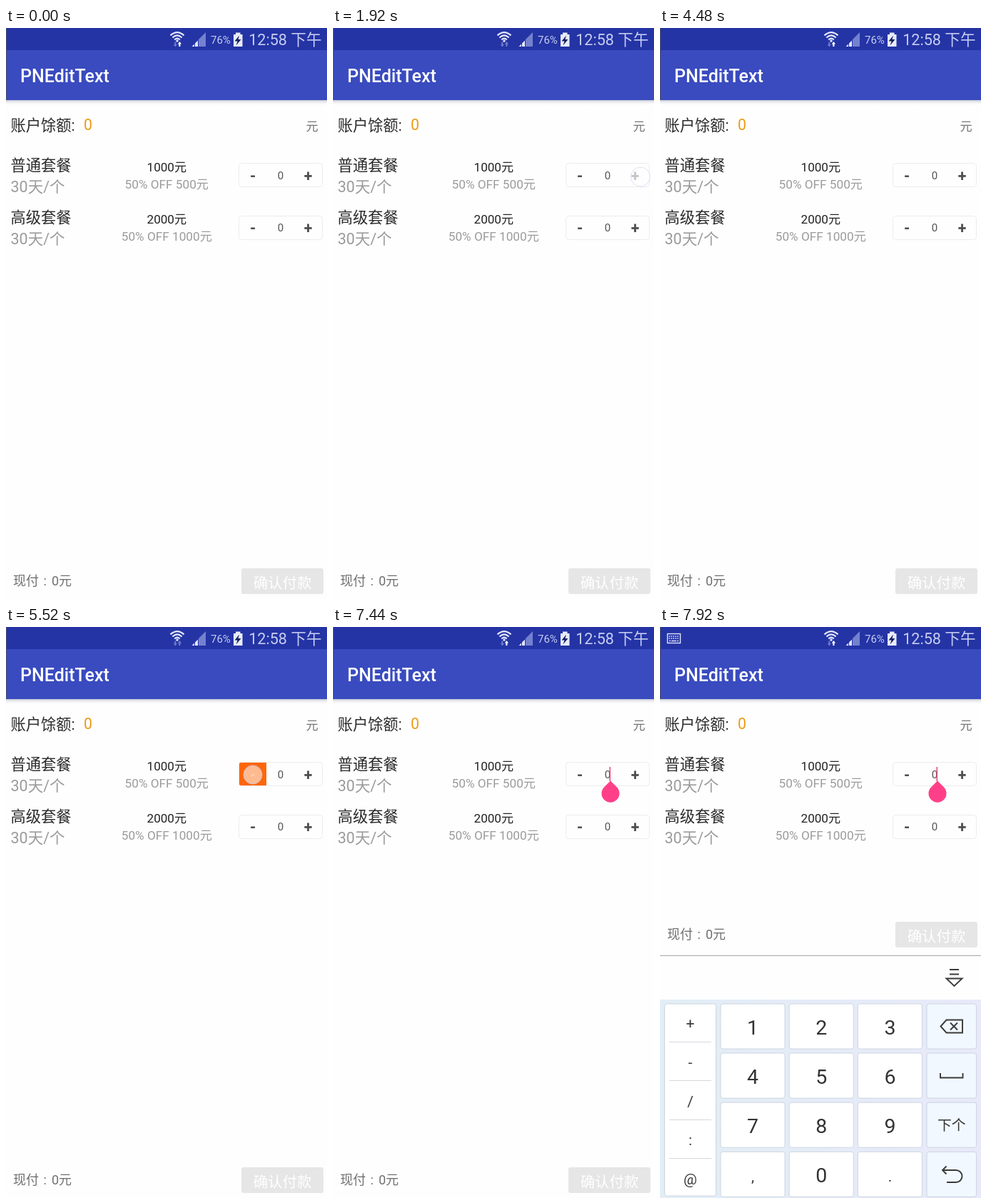
These frames come from a looping animation (450 px wide and 800 px high, 8 s). An HTML page:

```html
<!DOCTYPE html>
<html lang="zh-CN">
<head>
<meta charset="utf-8">
<title>PNEditText</title>
<style>
html, body { margin: 0; width: 100%; height: 100%; overflow: hidden; background: #fefefe; }
svg { display: block; width: 100vw; height: 100vh; }
text { font-family: Roboto, "Noto Sans CJK SC", "Noto Sans CJK", sans-serif; white-space: pre; }
.mid { text-anchor: middle; }
.name { font-size: 21.25px; fill: #2b2b2b; }
.days { font-size: 21.5px; fill: #9b9b9b; }
.price { font-size: 17.1px; fill: #222; text-anchor: middle; }
.off { font-size: 17.2px; fill: #9b9b9b; text-anchor: middle; }
.op { font-size: 21.25px; font-weight: 700; fill: #505050; text-anchor: middle; }
.num { font-size: 15px; fill: #555; text-anchor: middle; }
.box { fill: #fefefe; stroke: #ececec; }
.touch { fill: #fff; fill-opacity: .55; stroke: #c3c8f2; stroke-opacity: .8; }
.key { fill: #fff; stroke: #c6ced9; stroke-width: .8; }
.side { fill: #f1f8ff; }
.digit { font-size: 28.5px; fill: #333; text-anchor: middle; }
.sym { font-size: 21px; fill: #3a3a3a; text-anchor: middle; }
.line { fill: none; stroke: #3a3a3a; stroke-width: 1.9; }

/* 8 s loop: one percent is one 80 ms step */
.anim { animation: 8s step-end infinite; }
.up { animation-name: up; }
.plus-bg { animation-name: plus-bg; }
.plus { animation-name: plus; }
.plus-touch { animation-name: plus-touch; }
.minus-bg { animation-name: minus-bg; }
.minus { animation-name: minus; }
.minus-touch { animation-name: minus-touch; }
.edit-touch { animation-name: edit-touch; }
.caret { animation-name: caret; }
.handle { animation-name: handle; }
.pay { animation-name: pay; }
.badge { animation-name: badge; }
.board { animation-name: board; }
.bar-line { animation-name: bar-line; }
.key-line { animation-name: key-line; }

@keyframes up {
  0%, 14%, 34%, 56%, 84%, 100% { fill: #fff; }
  4%, 22%, 42%, 64% { fill: #6f7cc9; }
}
@keyframes plus-bg {
  0%, 8%, 16%, 24%, 33%, 43%, 100% { opacity: 0; }
  5%, 13%, 21%, 30%, 40% { opacity: 1; }
  7%, 15%, 23%, 32%, 42% { opacity: .4; }
}
@keyframes plus {
  0%, 10%, 18%, 26%, 35%, 45%, 100% { fill: #505050; }
  5%, 13%, 21%, 30%, 40% { fill: #fff; }
  7%, 15%, 23%, 32%, 42% { fill: #ddd; }
  8%, 16%, 24%, 33%, 43% { fill: #a0a0a0; }
  9%, 17%, 25%, 34%, 44% { fill: #6c6c6c; }
}
@keyframes plus-touch {
  0%, 9%, 17%, 25%, 34%, 44%, 100% { opacity: 0; }
  5%, 13%, 21%, 30%, 40% { opacity: 1; }
  8%, 16%, 24%, 33%, 43% { opacity: .7; }
}
@keyframes minus-bg {
  0%, 53%, 62%, 71%, 80%, 100% { opacity: 0; }
  50%, 59%, 68%, 77% { opacity: 1; }
  52%, 61%, 70%, 79% { opacity: .4; }
}
@keyframes minus {
  0%, 55%, 64%, 73%, 82%, 100% { fill: #505050; }
  50%, 59%, 68%, 77% { fill: #fb8a40; }
  52%, 61%, 70%, 79% { fill: #ddd; }
  53%, 62%, 71%, 80% { fill: #a0a0a0; }
  54%, 63%, 72%, 81% { fill: #6c6c6c; }
}
@keyframes minus-touch {
  0%, 54%, 63%, 72%, 81%, 100% { opacity: 0; }
  50%, 59%, 68%, 77% { opacity: 1; }
  53%, 62%, 71%, 80% { opacity: .7; }
}
@keyframes edit-touch {
  0%, 90%, 100% { opacity: 0; }
  87% { opacity: 1; }
  89% { opacity: .5; }
}
@keyframes caret {
  0%, 100% { opacity: 0; }
  88% { opacity: .4; }
  89% { opacity: 1; }
}
@keyframes handle {
  0%, 100% { opacity: 0; }
  90% { opacity: 1; }
}
@keyframes pay {
  0%, 100% { transform: translateY(0); }
  96% { transform: translateY(-344px); }
}
@keyframes badge {
  0%, 100% { opacity: 0; }
  95% { opacity: 1; }
}
@keyframes board {
  0%, 100% { opacity: 0; transform: translateY(80px); }
  95% { opacity: .3; transform: translateY(45px); }
  96% { opacity: .65; transform: translateY(24px); }
  97% { opacity: .88; transform: translateY(8.5px); }
  98% { opacity: .98; transform: translateY(1px); }
  99% { opacity: 1; transform: translateY(0); }
}
@keyframes bar-line {
  0%, 100% { opacity: 0; }
  98% { opacity: 1; }
}
@keyframes key-line {
  0%, 100% { opacity: 1; }
  98% { opacity: 0; }
}
</style>
</head>
<body>
<svg viewBox="0 0 450 800">
  <defs>
    <linearGradient id="shade" x2="0" y2="1">
      <stop stop-color="#8f93a8" stop-opacity=".5"/>
      <stop offset=".4" stop-color="#c9cbd6" stop-opacity=".3"/>
      <stop offset="1" stop-color="#fff" stop-opacity="0"/>
    </linearGradient>
    <linearGradient id="tint">
      <stop stop-color="#e2eef6"/>
      <stop offset="1" stop-color="#e8e9f9"/>
    </linearGradient>
  </defs>

  <rect width="450" height="800" fill="#fefefe"/>
  <rect y="101" width="450" height="8" fill="url(#shade)"/>
  <rect width="450" height="101" fill="#394bbf"/>
  <rect width="450" height="31" fill="#2434a5"/>
  <rect width="1" height="101" fill="#444a6b"/>

  <!-- status bar -->
  <g class="anim badge" opacity="0" stroke="#dfe3f8" fill="none">
    <rect x="10.5" y="9.5" width="18" height="13" stroke-width="1.4"/>
    <path d="M12.5 13H27M12.5 16H27" stroke-width="1.7" stroke-dasharray="1.7 1.2"/>
    <path d="M13 19.5H15M16 19.5H23M24 19.5H26" stroke-width="1.7"/>
  </g>
  <g fill="none" stroke="#e4e7fa" stroke-width="2.1">
    <path d="M230.5 10.4Q240 1.8 249.5 10.4"/>
    <path d="M233.4 13.5Q240 7.3 246.6 13.5"/>
    <path d="M236.3 16.4Q240 13 243.7 16.4"/>
  </g>
  <circle cx="240" cy="18" r="1.7" fill="#e4e7fa"/>
  <path d="M236.3 19.5h2v3.5h1.6l-2.6 3.5l-2.6-3.5h1.6z" fill="#6f7cc9"/>
  <path class="anim up" d="M242.3 26v-3.5h-1.6l2.7-3.5l2.7 3.5h-1.7v3.5z" fill="#fff"/>
  <path d="M270 26V16L280 6V26z" fill="#7481cf"/>
  <path d="M260.5 26L264 22.5V26zM265 26V21.5L269 17.5V26z" fill="#e4e7fa"/>
  <text x="287" y="21.5" font-size="15" fill="#c6ccf0">76%</text>
  <path d="M322 6.500h6.500v2.500h3v17h-12.500v-17h3z" fill="#e8ebfb"/>
  <path d="M327 10.500l-6.500 8h4l-2 6l7-8.500h-4z" fill="#14205f"/>
  <text x="340.2" y="24" font-size="21.6" fill="#c6ccf0">12:58 下午</text>

  <text x="20" y="76" font-size="25" font-weight="500" fill="#fff">PNEditText</text>

  <!-- balance -->
  <text class="name" x="6.5" y="144">账户馀额:</text>
  <text x="109" y="143" font-size="21.25" fill="#ec9a12">0</text>
  <text x="420.5" y="144" font-size="17.2" fill="#757575">元</text>

  <!-- first plan -->
  <text class="name" x="6.5" y="200">普通套餐</text>
  <text class="days" x="6.5" y="230">30天/个</text>
  <text class="price" x="225.3" y="201">1000元</text>
  <text class="off" x="225.3" y="225">50% OFF 500元</text>
  <rect class="box" x="326.5" y="189.5" width="117" height="33" rx="4"/>
  <path class="anim minus-bg" opacity="0" d="M365 190V222H329Q327 222 327 220V192Q327 190 329 190z" fill="#ff660a"/>
  <path class="anim plus-bg" opacity="0" d="M405 190V222H441Q443 222 443 220V192Q443 190 441 190z" fill="#ff660a"/>
  <text class="op anim minus" x="346" y="215">-</text>
  <text class="op anim plus" x="423.5" y="215">+</text>
  <text class="num" x="385" y="212">0</text>
  <path class="anim caret" opacity="0" d="M388.3 196V216" stroke="#e8467c" stroke-width="1.5"/>

  <!-- second plan -->
  <text class="name" x="6.5" y="273">高级套餐</text>
  <text class="days" x="6.5" y="303">30天/个</text>
  <text class="price" x="225.3" y="274">2000元</text>
  <text class="off" x="225.3" y="298">50% OFF 1000元</text>
  <rect class="box" x="326.5" y="263.5" width="117" height="33" rx="4"/>
  <text class="op" x="346" y="288">-</text>
  <text class="op" x="423.5" y="288">+</text>
  <text class="num" x="385" y="285">0</text>

  <!-- touches and caret handle -->
  <circle class="touch anim plus-touch" opacity="0" cx="431" cy="208.5" r="13.5"/>
  <circle class="touch anim minus-touch" opacity="0" cx="346" cy="207" r="13"/>
  <circle class="touch anim edit-touch" opacity="0" cx="397" cy="203.5" r="13.5"/>
  <path class="anim handle" opacity="0" d="M389 215.5l8.8 8.8a12.5 12.5 0 1 1 -17.6 0z" fill="#ff4088"/>

  <!-- payment bar -->
  <g class="anim pay">
    <text y="781" font-size="18" fill="#707070"><tspan x="10">现付</tspan><tspan x="52.5">:</tspan><tspan x="64">0元</tspan></text>
    <rect x="330" y="757" width="115" height="36" rx="3" fill="#e6e6e6"/>
    <text class="mid" x="387.5" y="784.5" font-size="20.4" fill="#fff">确认付款</text>
  </g>

  <!-- keyboard -->
  <g class="anim board" opacity="0">
    <rect y="460" width="450" height="62" fill="#fefefe"/>
    <path class="anim bar-line" d="M0 460.5H450" stroke="#a6a6ac"/>
    <path class="line" d="M406 480H419M406 486.5H419M401.5 492.5H423.5L412.5 503z"/>
    <rect y="522" width="450" height="288" fill="url(#tint)"/>
    <path class="anim key-line" d="M0 522H450" stroke="#b0b6be"/>
    <rect class="key" x="6.5" y="528" width="72" height="269" rx="3"/>
    <path d="M13 581.5H72M13 635.5H72M13 690.5H72M13 744.5H72" stroke="#d4d8dd"/>
    <g class="sym">
      <text x="42.5" y="562">+</text>
      <text x="42.5" y="616.5">-</text>
      <text x="42.5" y="671.5">/</text>
      <text x="42.5" y="726">:</text>
      <text x="42.5" y="780.5">@</text>
    </g>
    <g id="keys"></g>
    <path class="line" d="M393.5 559.5L401.5 550.5H424V568.5H401.5zM407 554.5L417 564.5M417 554.5L407 564.5"/>
    <path class="line" d="M393 625V631.5H424.5V625"/>
    <text class="mid" x="408.7" y="705" font-size="19.8" fill="#333">下个</text>
    <path class="line" d="M401.5 755.5L396 761L401.5 766.500M396 761H415A8.500 8.500 0 0 1 415 778H402"/>
  </g>
</svg>
<script>
const NS = "http://www.w3.org/2000/svg";
const keys = document.getElementById("keys");

function add(tag, attrs, label) {
  const el = document.createElementNS(NS, tag);
  for (const name in attrs) el.setAttribute(name, attrs[name]);
  if (label) el.textContent = label;
  keys.append(el);
}

["123", "456", "789", ",0."].forEach((labels, row) => {
  const y = 528 + row * 69.1;
  [...labels].forEach((label, col) => {
    const x = 85 + col * 96.2;
    const mark = label === "," || label === ".";
    add("rect", { class: "key", x, y, width: 90, height: 63, rx: 3 });
    add("text", { class: mark ? "sym" : "digit", x: x + 45, y: y + (mark ? 41.5 : 43) }, label);
  });
  add("rect", { class: "key side", x: 374, y, width: 69.5, height: 63, rx: 3 });
});
</script>
</body>
</html>
```
